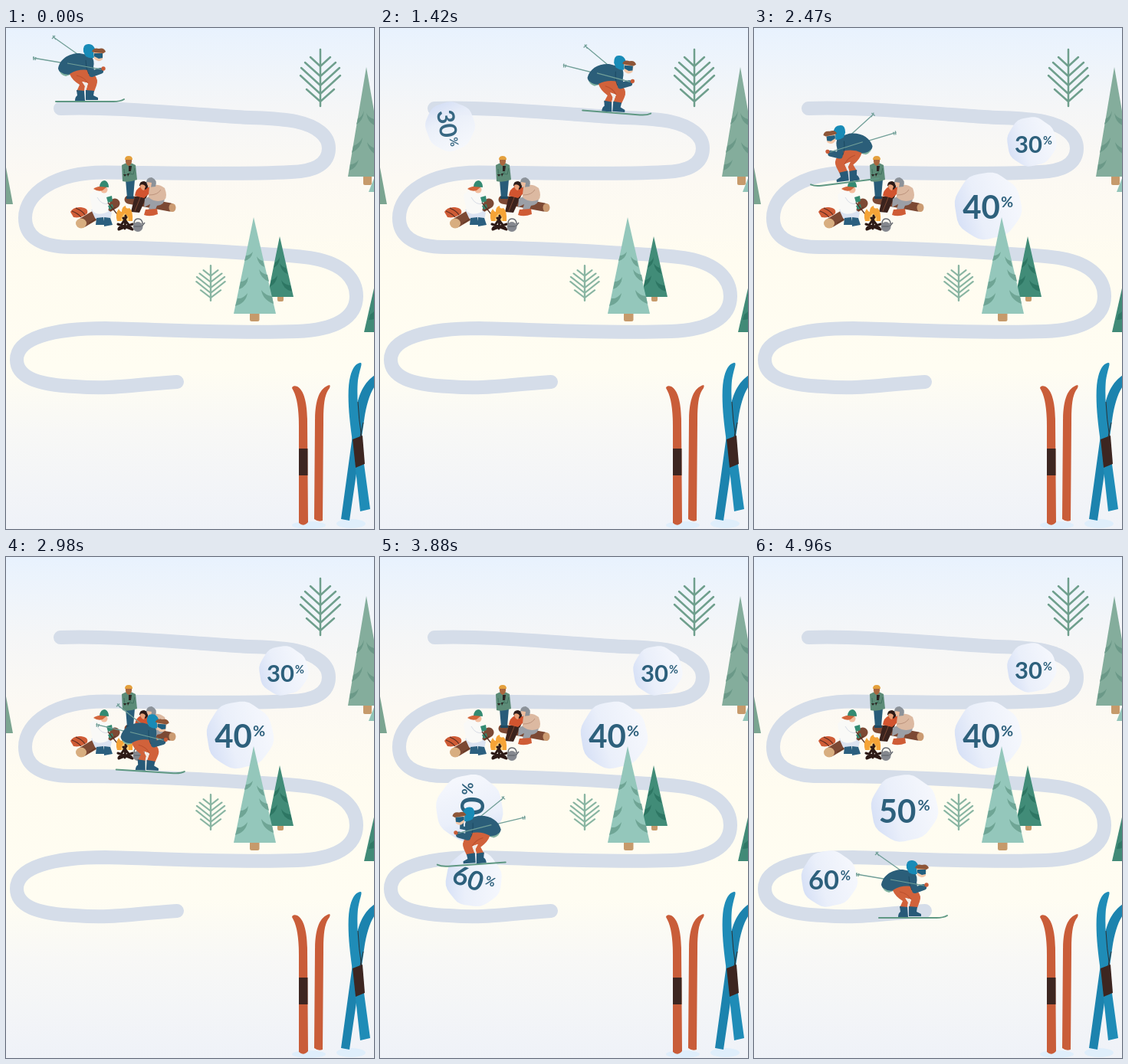
Recreate the animation shown at these times as an HTML page. Size 480 by 654 pixels, loop 5.96 s.

```html
<!DOCTYPE html>
<html lang="en">
<head>
<meta charset="utf-8">
<title>Ski slope</title>
<style>
html, body { margin: 0; width: 100%; height: 100%; overflow: hidden; background: #fffbf0; }
svg { display: block; width: 100vw; height: 100vh; }
text { font-family: Lato, "Open Sans", sans-serif; font-weight: 700; fill: #2d607c; text-anchor: middle; }
</style>
</head>
<body>
<svg viewBox="0 0 480 654" preserveAspectRatio="none">
<defs>
  <linearGradient id="sky" x1="0" y1="0" x2="0" y2="1">
    <stop offset="0" stop-color="#e8f2fe"/>
    <stop offset=".07" stop-color="#eef4fb"/>
    <stop offset=".16" stop-color="#f5f6f7"/>
    <stop offset=".3" stop-color="#fcf9f3"/>
    <stop offset=".46" stop-color="#fffcf0"/>
    <stop offset=".68" stop-color="#fffdf2"/>
    <stop offset=".8" stop-color="#f8f8f6"/>
    <stop offset="1" stop-color="#eff2f8"/>
  </linearGradient>
  <linearGradient id="snow" x1="0" y1=".65" x2="1" y2=".35">
    <stop offset="0" stop-color="#d6e0f6"/>
    <stop offset=".35" stop-color="#eaeffa"/>
    <stop offset="1" stop-color="#f6f8fd"/>
  </linearGradient>
  <g id="twig" fill="none" stroke-linecap="round">
    <path d="M0 0V74M-13 10L0 22L13 10M-20 17L0 35L20 17M-25 24L0 47L25 24M-26 34L0 58L26 34M-18 52L0 68L18 52"/>
  </g>
</defs>

<rect width="480" height="654" fill="url(#sky)"/>
<path fill="none" stroke="#d5dde9" stroke-width="18" stroke-linecap="round" d="M71 105C125 102 225 111 300 116C330 118 352 117 378 122C406 128 421 141 421 157C421 176 405 187 372 188C300 192 215 189 130 188.500C65 188 25 215 25 248C25 272 45 286 85 286C160 286 240 289 300 293C350 296 375 296 402 301C440 308 457 328 457 350C457 378 430 394 380 396C300 399 210 394 130 392C60 392 14 405 14 433C14 455 40 466 90 468C140 472 160 466 223 462"/>

<!-- edge trees -->
<use href="#twig" transform="translate(410 28)" stroke="#6f9f8d" stroke-width="2.5"/>
<use href="#twig" transform="translate(267 310) scale(.72 .62)" stroke="#89b5a2" stroke-width="3.3"/>
<path fill="#92c4b8" d="M484 186L473 214H500Z"/>
<rect x="466" y="191" width="11" height="14" rx="2" fill="#c69a6b"/>
<path fill="#84ad9c" d="M470 51L446 194H495Z"/>
<path fill="#6b9988" d="M459 118Q464 117 467 108Q466 121 457 126ZM453 154Q461 151 465 143Q464 156 451 163ZM480 119Q473 117 470 111Q472 124 481 127ZM485 158Q475 156 471 149Q473 162 488 168ZM449 178Q455 178 460 172Q457 183 448 186Z"/>
<path fill="#7ba591" d="M-6 150L9 230H-6Z"/>
<path fill="#418a77" d="M484 322L467 397H490Z"/>
<path fill="#2f7866" d="M475 374Q479 372 483 366V379Q478 381 473 381Z"/>

<!-- skis -->
<g fill="#dfeefb"><ellipse cx="395" cy="649" rx="22" ry="5"/><ellipse cx="450" cy="647" rx="19" ry="6"/></g>
<path fill="#c95d39" d="M382 646V520C382 494 379 480 373 470Q374 466 380 468C389 473 393 490 393 515L394 645Q388 652 382 646ZM402 641L403 515C403 487 408 470 422 466Q424 468 420 473C415 481 414 495 414 515L413 643Q407 645 402 641Z"/>
<rect x="382" y="549" width="11.5" height="35" fill="#3d2621"/>
<path fill="#1c83ae" d="M437 641L455 510C458 480 466 462 484 451V464C474 475 469 495 466 520L448 643Z"/>
<path fill="#1f8cb7" d="M462 631L452 540C446 500 445 470 449 455C452 443 457 437 463 437C465 439 461 446 459 460C457 480 460 510 463 540L475 628Z"/>
<path fill="none" stroke="#2b3438" d="M459 488Q460 510 464 535M466 515L462 534"/>
<path fill="#3d2621" d="M452 537L465 532L468 569L456 574Z"/>

<g id="balls"></g>

<!-- campfire -->
<g>
  <path stroke="#7c4934" stroke-width="13" stroke-linecap="round" d="M100 254L142 229"/>
  <path stroke="#633726" stroke-width="1.200" d="M108 255L143 234"/>
  <ellipse cx="98" cy="255" rx="7" ry="6.500" fill="#d8ae80"/>
  <path stroke="#7c4934" stroke-width="11" stroke-linecap="round" d="M160 224L214 234"/>
  <ellipse cx="217" cy="234.500" rx="4.500" ry="5.500" fill="#cb9b72"/>
  <path fill="#cf5c36" d="M84 240Q88 233 98 234Q108 235 106 242Q98 249 88 247Z"/>
  <path fill="none" stroke="#5a2d20" stroke-width="1.200" d="M86 239Q94 242 98 247M91 235Q100 239 103 244"/>

  <path fill="#285c79" d="M156 198H168L166 221L158 222Z"/>
  <path fill="#1d4962" d="M157 220H167V223H157Z"/>
  <path fill="#5c8b77" d="M151 179Q160 173 169 179L171 198Q160 202 152 200Z"/>
  <path fill="#a9673f" d="M156 171H164Q165 178 160 180Q155 178 156 171Z"/>
  <path fill="#e4a03d" d="M155 172Q155 167 160 167Q165 167 165 172Z"/>
  <path fill="none" stroke="#3f6f5d" d="M154 184L155 193L163 188M168 183L166 191L160 190"/>
  <path fill="#2b2422" d="M160 180H164L163 187H160ZM153 191H157L155 194ZM158 190H161L159 194Z"/>

  <path fill="#dbe3f1" d="M111 237Q126 231 138 241L136 250L126 247L123 255L116 248Z"/>
  <path fill="#2b5f7f" d="M118 248L127 247L129 257H117ZM128 247L136 248L139 257L128 259Z"/>
  <path fill="#f9f9f7" d="M109 218Q116 209 128 213Q135 216 136 225L133 240Q120 246 113 239Z"/>
  <path fill="none" stroke="#d8dce5" d="M119 221Q125 232 134 229"/>
  <circle cx="128" cy="211" r="4.500" fill="#f2bd9e"/>
  <path fill="#d3663b" d="M114 210Q120 205 132 207L126 212Q120 214 114 210Z"/>
  <path fill="#338a72" d="M122 207Q123 199 129 199Q134 201 134 208ZM131 221L138 219L139 226L133 228ZM133 232L139 230L140 235L135 237Z"/>
  <path stroke="#573226" stroke-width="1.300" d="M133 228L149 248"/>

  <path fill="#3b231d" d="M168 220L185 217L174 241L163 240Z"/>
  <path fill="none" stroke="#7c4934" d="M176 219L168 239"/>
  <path fill="#9b9fa6" d="M181 223Q195 214 207 222Q207 231 197 232L194 239L186 237L188 230L180 234Z"/>
  <path fill="#dcb9a1" d="M186 208Q197 201 207 209Q211 220 207 224Q195 229 186 221Z"/>
  <path fill="none" stroke="#bd947d" d="M202 211Q198 218 187 218"/>
  <path fill="#d2542f" d="M168 219Q169 210 176 207L187 208L186 217L180 222Z"/>
  <path fill="#2c1916" d="M174 206Q174 200 180 200Q186 201 185 208L182 211Z"/>
  <path fill="#e9a078" d="M175 205Q180 203 182 207L180 212Q176 212 175 205Z"/>
  <path fill="#8c9299" d="M183 202Q183 195 190 195Q198 198 195 207L186 208Z"/>
  <path fill="#efbd9d" d="M184 201L190 202L189 208Q184 208 184 201Z"/>
  <path fill="#cf5c36" d="M182 237L197 236L198 243Q188 247 180 244Z"/>

  <path fill="#f5a437" d="M145 252Q142 243 147 236Q149 240 151 240Q151 233 156 232Q156 237 161 235Q166 239 165 252Z"/>
  <path fill="#ffd07a" d="M150 252Q150 246 155 242Q161 246 160 252Z"/>
  <path stroke="#2d1a16" stroke-width="3" stroke-linecap="round" d="M147 262L157 247M164 262L153 248M155 262L156 245M146 256L165 263M165 256L147 263"/>
  <ellipse cx="172" cy="259.500" rx="6.500" ry="6.500" fill="#85888f"/>
  <path fill="none" stroke="#686c73" stroke-width="1.500" d="M167 256Q167 249 172 249Q178 249 178 256M177 259L181 254M167 259H176"/>
</g>

<!-- middle trees -->
<rect x="354" y="349" width="8" height="8" rx="2" fill="#c69a6b"/>
<path fill="#418c78" d="M357 272L341 351H375Z"/>
<path fill="#2d7663" d="M351 306Q355 304 357 299Q357 309 349 313ZM365 313Q360 312 357 307Q359 318 367 321ZM346 329Q351 328 354 323Q353 333 344 338ZM371 336Q363 335 359 329Q361 341 373 344Z"/>
<rect x="318" y="371" width="12.500" height="12" rx="2.500" fill="#c69a6b"/>
<path fill="#94c7bb" d="M323 247L297 373H352Z"/>
<path fill="#6fa595" d="M313 297Q318 297 322 292Q320 302 311 304ZM335 304Q330 303 327 298Q329 309 337 312ZM306 331Q312 331 316 325Q315 337 304 341ZM341 322Q334 321 330 315Q332 327 343 331ZM302 353Q309 354 315 346Q313 359 299 363ZM347 350Q338 349 333 342Q335 355 349 360Z"/>

<!-- skier, with its ski centred on 110,95 -->
<g id="skier"><g transform="translate(-110 -95)">
  <path fill="none" stroke="#719f98" stroke-width="1.300" d="M62 12L96 36M60 14L64 10M61 10L65 15M35 39L124 54M36 37V42M39 38L38 42"/>
  <path fill="#80b2a0" d="M69 54Q70 61 78 63L92 58L80 47Z"/>
  <path fill="#2b5e79" d="M68 53C70 41 81 33 96 33L111 36Q116 42 114 51L105 56Q93 56 86 60Q77 62 72 58Q69 57 68 53Z"/>
  <path fill="#d1623b" d="M83 60Q94 53 108 55L115 61Q121 67 118 75L115 83H104L107 72L99 70L103 76L102 83H92L96 74Q86 68 83 60Z"/>
  <path fill="#f1ebe7" d="M100 70L107 72L104 82H102L103 76Z"/>
  <path fill="none" stroke="#b94f2e" d="M92 62Q102 64 107 72"/>
  <path fill="#275a78" d="M92 81L102 82L103 95H90Q90 90 93 88ZM104 81L115 82L114 88L120 91V94H104Z"/>
  <path fill="none" stroke="#2b5e79" stroke-width="8" stroke-linejoin="round" stroke-linecap="round" d="M108 42L112 60L123 56"/>
  <path fill="none" stroke="#1d4a63" d="M104 42Q104 53 108 60"/>
  <path fill="#188bb7" d="M101 31Q100 21 107 21Q113 20 116 27L116 38Q111 41 104 37Z"/>
  <path fill="#f4c7a8" d="M114 30H127L126 41Q120 46 115 40Z"/>
  <path fill="#8e5638" d="M112 31Q114 25 121 27Q128 25 130 31L127 33L116 32Z"/>
  <path fill="#205f80" d="M115 33H126V39L121 40L115 37Z"/>
  <path stroke="#719f98" stroke-width="1.200" d="M80 46L124 54"/>
  <circle cx="127" cy="53" r="2.700" fill="#c95d39"/>
  <path fill="none" stroke="#5f9883" stroke-width="2" stroke-linecap="round" d="M65 96H140Q149 96 154 93"/>
</g></g>
</svg>

<script>
const LOOP = 5960, START = 1000, STEP = 30, END = 4960;

// dir: 1 rolls in from the left, -1 from the right
const balls = [
  { n: 30, x: 362, y: 148.5, r: 32, size: 31, tx: -4, px: 21, base: 14.5,
    dir: 1, start: 1307, dur: 1077, turn: 333, slope: 0.075, hop: 24, hop2: 7, rest: 5040 },
  { n: 40, x: 305, y: 232.5, r: 43.5, size: 42, tx: -8.5, px: 25, base: 16.5,
    dir: -1, start: 1307, dur: 1077, turn: 400, slope: 0.105, hop: 33, hop2: 5, rest: 4900 },
  { n: 50, x: 196, y: 328, r: 43.5, size: 42, tx: -9, px: 25.5, base: 18.5,
    dir: 1, start: 3400, dur: 820, turn: 360, slope: 0, hop: 25, hop2: 5, rest: 4900 },
  { n: 60, x: 98, y: 420, r: 36.5, size: 34.5, tx: -7, px: 21.5, base: 14,
    dir: -1, start: 3017, dur: 1077, turn: 258, slope: 0, hop: 25.5, hop2: 5, rest: 4900 }
];

// time, x, y, tilt
const route = [
  [1000, 124, 95, 0], [1290, 252, 104, 3], [1560, 366, 119, 6], [1780, 430, 141.5, 8],
  [1850, 437, 164, 0], [1950, 396, 191, -5], [2140, 296, 198, -6], [2470, 118, 201, -7],
  [2570, 52, 220, -7], [2650, 28, 248, 0], [2720, 48, 270, 2], [2800, 90, 277, 3],
  [3090, 250, 281, 4], [3370, 410, 293, 6], [3440, 449, 318, 2], [3490, 445, 348.5, -6],
  [3570, 398, 392, -5], [3660, 318, 402, -3], [3890, 110, 401, -4], [3980, 38, 416, -5],
  [4050, 16, 438, 0], [4110, 48, 460, 2], [4190, 112, 471, 1], [4300, 208, 470, 0]
];
const flips = [1845, 2650, 3440, 4050];

const skier = document.getElementById("skier");
const clamp = v => Math.max(0, Math.min(1, v));

function blob(r) {
  let d = "";
  for (let i = 0; i < 44; i++) {
    const a = i / 44 * 2 * Math.PI;
    const q = r * (1 + 0.014 * Math.sin(3 * a + 1) + 0.018 * Math.sin(8 * a));
    d += (i ? "L" : "M") + (q * Math.cos(a)).toFixed(2) + " " + (q * Math.sin(a)).toFixed(2);
  }
  return d + "Z";
}

document.getElementById("balls").innerHTML = balls.map(b => `<g>
  <path d="${blob(b.r)}" fill="url(#snow)"/>
  <text x="${b.tx}" y="${b.base}" font-size="${b.size}">${b.n}</text>
  <text x="${b.px}" y="${b.base - 0.36 * b.size}" font-size="${0.47 * b.size}">%</text></g>`).join("");
const ballNodes = document.getElementById("balls").children;

// smooth curve through unevenly timed keys
function along(t) {
  const last = route.length - 1;
  if (t >= route[last][0]) return route[last].slice(1);
  const i = route.findIndex((k, j) => j < last && t < route[j + 1][0]);
  const a = route[i], b = route[i + 1], span = b[0] - a[0], u = (t - a[0]) / span;
  const slope = (j, c) => {
    const p = route[Math.max(0, j - 1)], q = route[Math.min(last, j + 1)];
    return (q[c] - p[c]) / (q[0] - p[0]) * span;
  };
  return [1, 2, 3].map(c => {
    const m = slope(i, c), n = slope(i + 1, c), d = b[c] - a[c];
    return a[c] + u * (m + u * (3 * d - 2 * m - n + u * (m + n - 2 * d)));
  });
}

function drawSkier(t) {
  const [x, y, tilt] = t < START ? [110, 95, 0] : along(t);
  const side = flips.filter(f => t >= f).length % 2 ? -1 : 1;
  skier.setAttribute("transform", `translate(${x} ${y}) rotate(${tilt}) scale(${side} 1)`);
}

function arc(t, from, to) {
  const u = clamp((t - from) / (to - from));
  return 4 * u * (1 - u);
}

function drawBall(b, node, t) {
  const s = (t - b.start) / b.dur;
  const left = Math.pow(1 - clamp(s), 1.6);
  const gap = 323 * left;
  const high = arc(t, 4070, 4560);
  const x = b.x - b.dir * gap;
  const y = b.y - b.slope * gap - b.hop * high - b.hop2 * arc(t, 4560, b.rest);
  node.setAttribute("opacity", clamp((t - b.start) / 120));
  node.setAttribute("transform",
    `translate(${x} ${y}) rotate(${-b.dir * b.turn * left}) scale(${1 + 0.025 * high})`);
}

function draw(now) {
  let t = now % LOOP;
  if (t >= START) t = Math.min(END, START + Math.floor((t - START) / STEP) * STEP);
  drawSkier(t);
  balls.forEach((b, i) => drawBall(b, ballNodes[i], t));
}

const begin = performance.now();
function tick() {
  draw(performance.now() - begin);
  requestAnimationFrame(tick);
}
tick();
</script>
</body>
</html>
```
